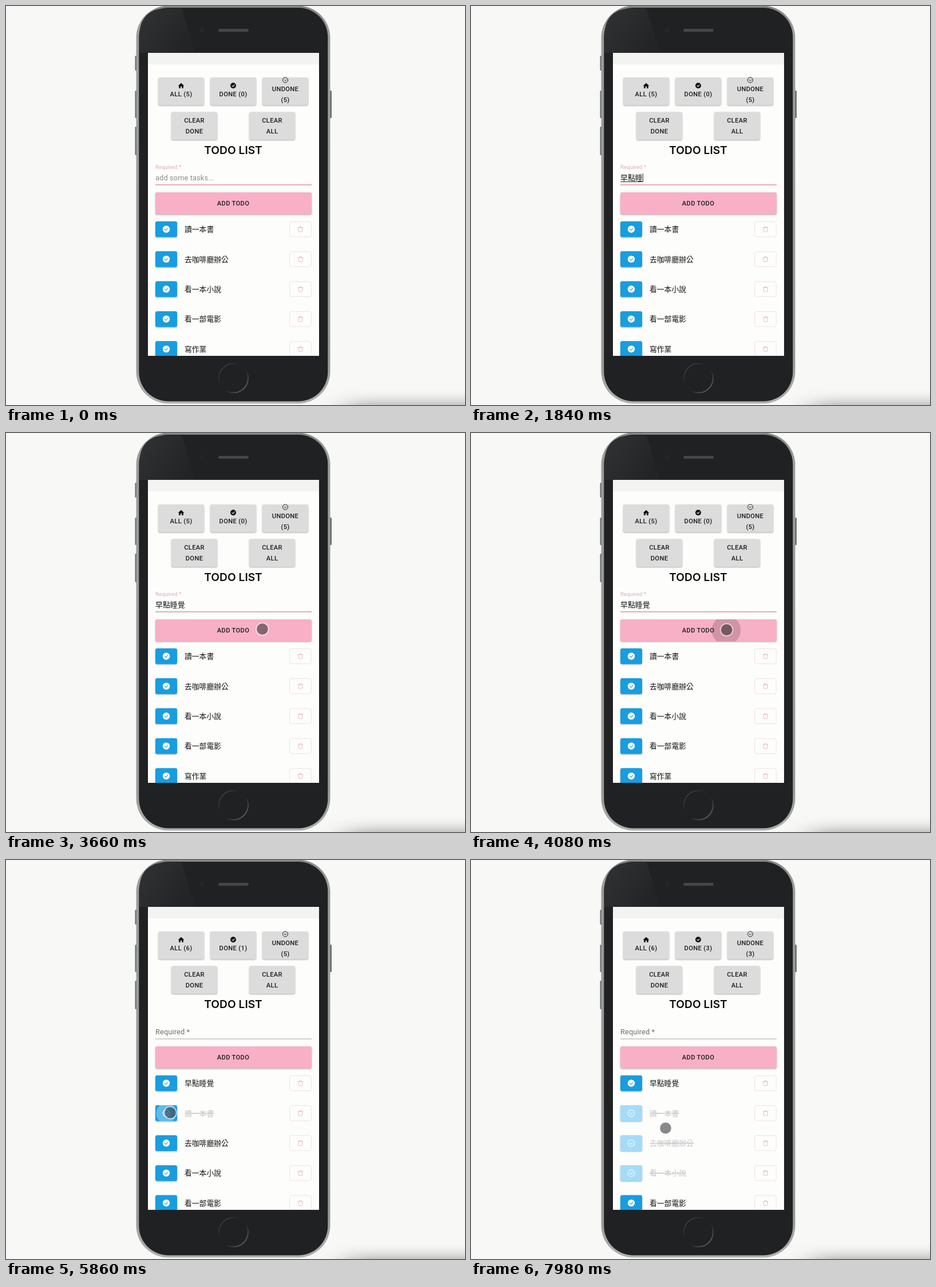
An HTML page for the animation above (8 s loop, 802x698 px).

```html
<!DOCTYPE html>
<html lang="zh-Hant">
<head>
<meta charset="utf-8">
<title>Todo list on a phone</title>
<style>
  html, body { margin: 0; width: 100%; height: 100%; overflow: hidden; background: #f8f8f7; }
  svg { display: block; }
  text { font-family: Roboto, "Noto Sans CJK TC", "Noto Sans CJK", sans-serif; white-space: pre; }
  .caps { font-size: 11.2px; font-weight: 500; letter-spacing: .32px; text-anchor: middle; fill: #1c1c1c; }
  .body { font-size: 12.8px; letter-spacing: .12px; }
  .task { font: 500 12.8px "Noto Sans CJK TC", "Noto Sans CJK", sans-serif; }
  .title { font: 600 19.2px Inter, sans-serif; text-anchor: middle; fill: #0c0c0c; }
  .raised { filter: drop-shadow(0 1.3px 1px rgba(0, 0, 0, .32)); }
  .line { fill: none; stroke-linecap: round; stroke-linejoin: round; }
</style>
</head>
<body>
<svg width="802" height="698" viewBox="0 0 802 698">
  <defs>
    <clipPath id="screen"><rect x="248" y="82" width="299" height="530"/></clipPath>
    <clipPath id="button"><rect x="261" y="-13.8" width="38" height="27.6" rx="3.2"/></clipPath>
    <clipPath id="addShape"><rect x="261" y="326" width="273" height="38.5" rx="3.2"/></clipPath>
    <filter id="blur" x="-30%" y="-200%" width="160%" height="500%"><feGaussianBlur stdDeviation="26 13"/></filter>
    <linearGradient id="metal" x2="0" y2="1">
      <stop offset="0" stop-color="#858785"/><stop offset=".06" stop-color="#9b9d9b"/>
      <stop offset=".9" stop-color="#989a98"/><stop offset="1" stop-color="#aeb0ae"/>
    </linearGradient>
    <linearGradient id="glare" x1="0" y1="0" x2="1" y2=".5">
      <stop offset="0" stop-color="#313233"/><stop offset="1" stop-color="#232426"/>
    </linearGradient>
    <linearGradient id="ring" x2="1" y2="1">
      <stop offset="0" stop-color="#4c4c4e"/><stop offset=".38" stop-color="#202123"/>
      <stop offset=".58" stop-color="#202123"/><stop offset="1" stop-color="#7c7c7e"/>
    </linearGradient>
  </defs>

  <rect width="802" height="698" fill="#f8f8f7"/>
  <rect x="595" y="697" width="400" height="60" fill="#959595" filter="url(#blur)"/>

  <g fill="#6b6d6c">
    <rect x="225.5" y="87" width="5" height="26" rx="1.5"/>
    <rect x="225.5" y="148" width="5" height="48" rx="1.5"/>
    <rect x="225.5" y="211" width="5" height="50" rx="1.5"/>
    <rect x="564" y="148" width="5" height="48" rx="1.5"/>
  </g>
  <rect x="227.500" y="-.5" width="339" height="696" rx="56" fill="url(#metal)"/>
  <rect x="232.300" y="3" width="330" height="688.500" rx="51.500" fill="#202123"/>
  <path d="M233 82V54Q233 4 282 4H307L330 82Z" fill="url(#glare)"/>
  <circle cx="343" cy="42.500" r="2.300" fill="#17171c" stroke="#444" stroke-width=".8"/>
  <rect x="371" y="40" width="53" height="5" rx="2.500" fill="#464646"/>
  <circle cx="397.500" cy="651" r="25.500" fill="none" stroke="url(#ring)" stroke-width="1.800"/>

  <g clip-path="url(#screen)">
    <rect x="248" y="82" width="299" height="530" fill="#fdfdfc"/>
    <path d="M248 82H547V106Q547 102 542 102H248Z" fill="#f3f3f2"/>
    <g id="filters"></g>
    <text class="title" x="397" y="258.500">TODO LIST</text>
    <text class="body" id="label">Required *</text>
    <text class="body" id="input" x="261" y="305.300"></text>
    <path id="composing" stroke="#333" stroke-width="1"/>
    <rect id="caret" y="293" width="1" height="15" fill="#222"/>
    <path d="M261 313H534" stroke="#9b9d8c" stroke-width=".9"/>
    <path id="focusLine" stroke="#efa5b6" stroke-width="1.700"/>
    <rect class="raised" x="261" y="326" width="273" height="38.500" rx="3.200" fill="#f8b0c7"/>
    <g clip-path="url(#addShape)"><circle id="addRipple" cx="446" cy="345" fill="#000"/></g>
    <text class="caps" x="397" y="349">ADD TODO</text>
    <g id="rows"></g>
    <g id="pointer">
      <circle r="10" fill="#282828" fill-opacity=".55"/>
      <circle r="10.800" fill="none" stroke="#fff" stroke-opacity=".5" stroke-width="2"/>
    </g>
  </g>
</svg>
<script>
const LOOP = 8000, ADD_AT = 4200, COMMIT_AT = 2850, PRESS = 140, PITCH = 52.4;
const $ = id => document.getElementById(id);
const clamp = v => Math.max(0, Math.min(1, v));
const ease = v => { v = clamp(v); return v * v * (3 - 2 * v); };
const easeOut = v => 1 - (1 - clamp(v)) ** 3;
const mix = (a, b, p) => a + (b - a) * p;
const mixColor = (a, b, p) => `rgb(${a.map((v, i) => Math.round(mix(v, b[i], p)))})`;
const set = (el, attrs) => { for (const k in attrs) el.setAttribute(k, attrs[k]); };

// check time is null for tasks that stay open
const tasks = [
  ['早點睡覺', null], ['讀一本書', 5840], ['去咖啡廳辦公', 6400],
  ['看一本小說', 7140], ['看一部電影', null], ['寫作業', null]
];

const typing = [
  [0, ''], [180, 'ㄗ'], [320, 'ㄗㄠ'], [480, '早'], [650, '早ㄉ'], [800, '早ㄉㄧ'],
  [950, '早ㄉㄧㄢ'], [1100, '早點'], [1300, '早點ㄕ'], [1450, '早點ㄕㄨ'],
  [1600, '早點ㄕㄨㄟ'], [1780, '早點睡'], [1980, '早點睡ㄐ'], [2150, '早點睡ㄐㄧ'],
  [2300, '早點睡ㄐㄧㄠ'], [2500, '早點睡覺'], [ADD_AT, '']
];

// time, x, y
const path = [
  [3150, 436, 306], [3600, 448, 343], [4400, 446, 345], [4880, 420, 360], [5500, 287, 442],
  [5900, 287, 442], [6220, 279, 501], [6650, 279, 501], [6980, 280, 550],
  [7320, 280, 550], [7850, 340, 469], [8000, 340, 469]
];

const chevron = (r, color, width) => `<g class="line" stroke="${color}" stroke-width="${width}">
  <circle r="${r}"/><path d="M${-r * .4} ${-r * .12}L0 ${r * .3}L${r * .4} ${-r * .12}"/></g>`;
const check = (r, fill, mark) => `<circle r="${r}" fill="${fill}"/>
  <path class="line" d="M${-r * .42} 0L${-r * .08} ${r * .34}L${r * .44} ${-r * .3}" stroke="${mark}" stroke-width="1.2"/>`;
const home = '<path d="M0-4.8L5.400 .2H3.800V4.500H1.200V1.300H-1.200V4.500H-3.800V.2H-5.400Z" fill="#111"/>';

const filterButton = (x, y, lines, icon = '', iconY = 0) => `<g transform="translate(${x} ${y})">
  <rect class="raised" x="-40" width="80" height="48.500" rx="3.200" fill="#dcdcdc"/>
  <g transform="translate(0 ${iconY})">${icon}</g>
  ${lines.map(([text, ty, id]) => `<text class="caps" y="${ty}" ${id ? `id="${id}"` : ''}>${text}</text>`).join('')}</g>`;

$('filters').innerHTML =
  filterButton(306, 125, [['', 33, 'all']], home, 14.5) +
  filterButton(397, 125, [['', 33, 'done']], check(5, '#111', '#dcdcdc'), 14.3) +
  filterButton(488, 125, [['UNDONE', 24], ['', 43, 'undone']], chevron(4.6, '#222', 1), 4.5) +
  filterButton(329, 185.5, [['CLEAR', 18.5], ['DONE', 37.5]]) +
  filterButton(465, 185.5, [['CLEAR', 18.5], ['ALL', 37.5]]);

$('rows').innerHTML = tasks.map(([name]) => `<g class="row">
  <rect class="raised fill" x="261" y="-13.800" width="38" height="27.600" rx="3.200"/>
  <g clip-path="url(#button)"><circle class="ripple" cx="280" fill="#fff"/></g>
  <g class="open" transform="translate(280 0)">${check(6.2, '#fff', '#3ba8df')}</g>
  <g class="closed" transform="translate(280 0)">${chevron(5.8, '#f4fbff', 1.1)}</g>
  <text class="task" x="312" y="4.600">${name}</text>
  <path class="strike" d="M312 .2h${name.length * 12.8}" stroke="#bcbcc4" stroke-width="1"/>
  <rect x="495.700" y="-13.200" width="37.600" height="26.400" rx="3.200" fill="none" stroke="#f0dfe8" stroke-width="1"/>
  <path class="line" transform="translate(514.500 0)" stroke="#e9bcc6" stroke-width="1"
    d="M-4.300-2.800H4.300M-1.700-2.900V-4.200H1.700V-2.900M-3.300-2.600V3.300Q-3.300 4.400-2.200 4.400H2.200Q3.300 4.400 3.300 3.300V-2.600"/>
</g>`).join('');
const rows = [...document.querySelectorAll('.row')].map(el => ({
  el, ...Object.fromEntries(['fill', 'ripple', 'open', 'closed', 'task', 'strike'].map(c => [c, el.querySelector('.' + c)]))
}));

function drawRipple(el, age, size, strength) {
  const opacity = age < 0 ? 0 : strength * (1 - clamp((age - 300) / 400));
  set(el, { r: size * easeOut(age / 450), opacity });
}

function drawForm(t) {
  const added = t >= ADD_AT, blur = easeOut((t - ADD_AT) / 200);
  const value = typing.filter(([at]) => at <= t).pop()[1];
  const empty = !value && !added, composing = value && t < COMMIT_AT;
  const end = 261 + value.length * 12.92;
  $('input').textContent = empty ? 'add some tasks...' : value;
  set($('input'), { fill: empty ? '#8d8d8d' : '#111' });
  set($('composing'), { d: composing ? `M261 307.500H${end}` : '' });
  const focused = t < ADD_AT - PRESS;
  const blinkOn = composing || (t - COMMIT_AT + 3000) % 1000 < 500;
  set($('caret'), { x: end, opacity: value && focused && blinkOn ? 1 : 0 });
  set($('label'), {
    transform: `translate(261 ${mix(285, 305.3, blur)}) scale(${mix(.75, 1, blur)})`,
    fill: mixColor([222, 170, 192], [112, 112, 108], blur)
  });
  const half = 136.5 * (1 - blur);
  set($('focusLine'), { d: half ? `M${397.5 - half} 312.500H${397.5 + half}` : '' });
  drawRipple($('addRipple'), t - ADD_AT + PRESS, 190, .16);
}

function drawList(t) {
  const added = t >= ADD_AT;
  rows.forEach((row, i) => {
    const toggleAt = tasks[i][1] ?? Infinity, closed = t >= toggleAt;
    const slot = added ? i : i - 1;
    set(row.el, { transform: `translate(0 ${390.5 + slot * PITCH})`, visibility: slot < 0 ? 'hidden' : 'visible' });
    set(row.fill, { fill: mixColor([24, 157, 224], [164, 220, 248], closed ? ease((t - toggleAt) / 250) : 0) });
    set(row.open, { opacity: closed ? 0 : 1 });
    set(row.closed, { opacity: closed ? 1 : 0 });
    set(row.task, { fill: closed ? '#c6c6c9' : '#111' });
    set(row.strike, { opacity: closed ? 1 : 0 });
    drawRipple(row.ripple, t - toggleAt + PRESS, 24, .3);
  });
  const total = added ? 6 : 5, done = tasks.filter(task => task[1] && t >= task[1]).length;
  $('all').textContent = `ALL (${total})`;
  $('done').textContent = `DONE (${done})`;
  $('undone').textContent = `(${total - done})`;
}

function drawPointer(t) {
  const next = path.findIndex(([at]) => at > t);
  if (next < 1) return set($('pointer'), { opacity: 0 });
  const [t0, x0, y0] = path[next - 1], [t1, x1, y1] = path[next];
  const p = ease((t - t0) / (t1 - t0));
  set($('pointer'), { opacity: 1, transform: `translate(${mix(x0, x1, p)} ${mix(y0, y1, p)})` });
}

const start = performance.now();
function frame(now) {
  const t = Math.max(0, now - start) % LOOP;
  drawForm(t);
  drawList(t);
  drawPointer(t);
  requestAnimationFrame(frame);
}
frame(start);
</script>
</body>
</html>
```
